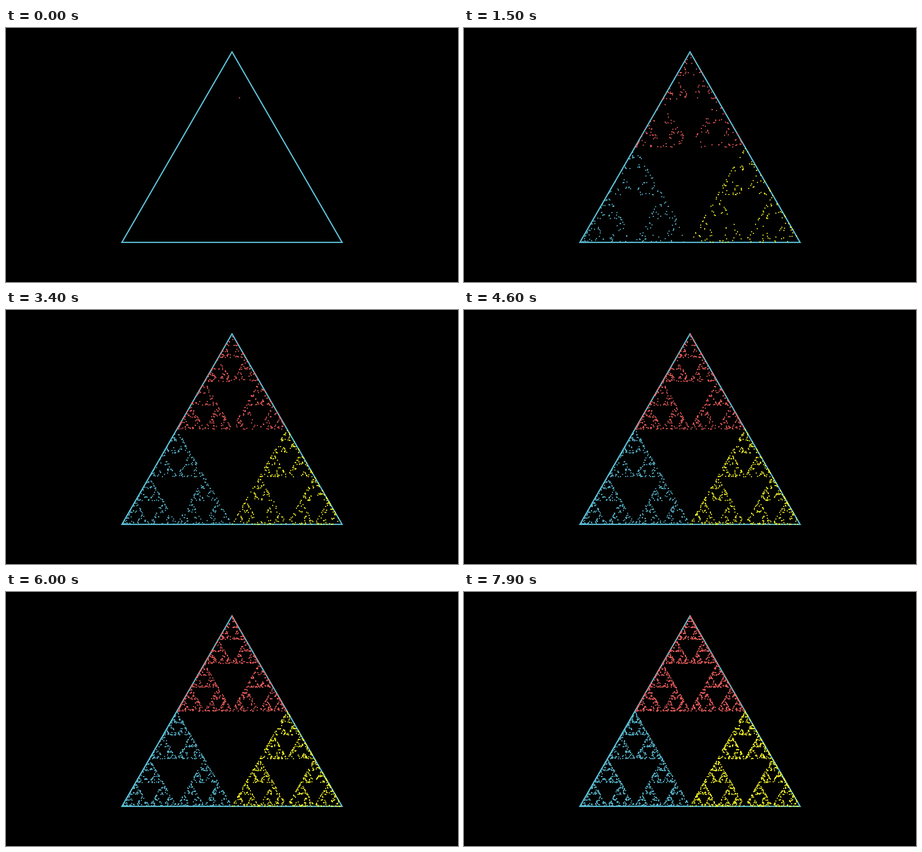
Animation of 800x450 px, one loop 8 s. Source, as a matplotlib script:

```python
import numpy as np
import matplotlib.pyplot as plt
from matplotlib.animation import FuncAnimation
from matplotlib.patches import Polygon

W, H, DPI = 800, 450, 100
FRAMES, INTERVAL = 80, 100
DOTS_PER_FRAME = 46
DOT_PX = 2.05
RED, BLUE, YELLOW = "#FA6462", "#5EC2DA", "#FDFD2A"

HEIGHT = 337.5
TOP = 42.3
HALF = HEIGHT / np.sqrt(3)
CORNERS = np.array([
    (W / 2, TOP),
    (W / 2 - HALF, TOP + HEIGHT),
    (W / 2 + HALF, TOP + HEIGHT),
])


def px(n):
    """Pixels to points."""
    return n * 72 / DPI


def chaos_game(start, count, seed=3):
    """Jump halfway to a random corner, over and over."""
    picks = np.random.default_rng(seed).integers(0, 3, count)
    picks[0] = 0
    points = np.empty((count, 2))
    points[0] = start
    for i in range(1, count):
        points[i] = (points[i - 1] + CORNERS[picks[i]]) / 2
    return points, picks


points, picks = chaos_game((413.3, 123.7), 1 + DOTS_PER_FRAME * FRAMES)
colors = np.array([RED, BLUE, YELLOW])[picks]

fig = plt.figure(figsize=(W / DPI, H / DPI), dpi=DPI, facecolor="black")
ax = fig.add_axes([0, 0, 1, 1])
ax.set_xlim(0, W)
ax.set_ylim(H, 0)
ax.axis("off")

ax.add_patch(Polygon(CORNERS, closed=True, fill=False, edgecolor=BLUE,
                     linewidth=px(2.2), joinstyle="miter", snap=False))
dots = ax.scatter(*points.T, s=px(DOT_PX) ** 2, c=colors, linewidths=0,
                  zorder=3, snap=False)


def update(frame):
    dots.set_offsets(points[:1 + DOTS_PER_FRAME * frame])
    return (dots,)


anim = FuncAnimation(fig, update, frames=FRAMES, interval=INTERVAL,
                     init_func=lambda: update(0), repeat=True,
                     repeat_delay=0)
plt.show()
```
